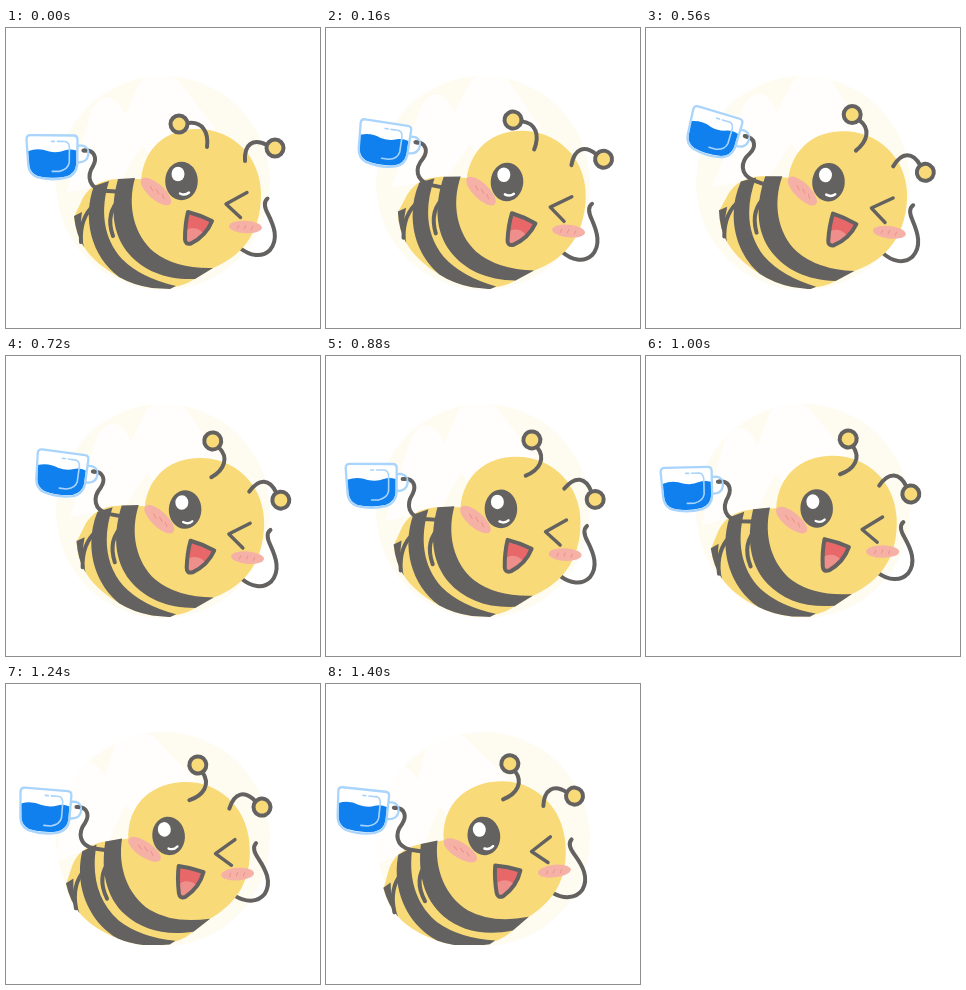
Recreate the animation shown at these times as an HTML page. Size 314 px wide and 300 px high, loop 1.44 s.

```html
<!DOCTYPE html>
<html lang="en">
<head>
<meta charset="utf-8">
<title>Waving bee</title>
<style>
  html, body { margin: 0; width: 100%; height: 100%; overflow: hidden; background: #fff; }
  svg { display: block; width: 314px; height: 300px; }
  .line { fill: none; stroke: #636260; stroke-width: 4; stroke-linecap: round; stroke-linejoin: round; }
  .dark { fill: #636260; }
  .yellow { fill: #f9da78; }
  .pink { fill: #f5b1a6; }
  .ball { fill: #f9da78; }
  .glass { fill: none; stroke: #a9d4fc; stroke-width: 2.3; stroke-linecap: round; stroke-linejoin: round; }
</style>
</head>
<body>
<svg viewBox="0 0 314 300">
  <defs>
    <clipPath id="disc"><circle cx="157" cy="155" r="107"/></clipPath>
    <clipPath id="floor"><rect width="314" height="261"/></clipPath>
    <path id="mouth" d="M182 184Q194 187 206 193Q200 208 185 215.5Q179 217 179 211Q179 196 182 184Z"/>
    <clipPath id="lips"><use href="#mouth"/></clipPath>
  </defs>

  <circle cx="157" cy="155" r="107" fill="#fefbf1"/>
  <g clip-path="url(#disc)">
    <g id="wings" fill="#fff" opacity=".75">
      <path d="M60 165L86 82Q98 60 113 76L137 116L115 152Z"/>
      <path d="M117 92L134 54Q150 38 172 52L210 102L150 135Z"/>
    </g>
  </g>

  <g clip-path="url(#floor)">
    <g id="bee">
      <path class="line" d="M234 220C244 228 256 230 264 222C273 211 268 198 262 186Q256 175 261.5 170.5"/>

      <path class="yellow" d="M136 151L112 151C95 152 82 158 75 174L68 189C70 212 82 232 113 249Q127 257 146 260Q172 262 189 251L207 240L150 150Z"/>
      <path class="yellow" d="M135 152C138 118 162 101 191 101C228 101 255 130 255 166C255 203 238 227 207 240C165 240 135 210 128 180Z"/>

      <path class="dark" d="M68 188L76 184Q73 200 78 219Q70 207 68 188Z"/>
      <path class="dark" d="M88 158L103 153C94 182 97 210 116 231Q135 250 170 258L164 261L146 260Q127 257 113 249C85 228 76 190 88 158Z"/>
      <path class="dark" d="M112 151L129 150C121 178 128 207 148 224Q170 241 207 240L189 251C160 252 138 243 123 226C106 206 104 180 112 151Z"/>
      <path class="line" d="M88 177C77 187 74 199 75 214M115 170C103 181 102 194 107 208"/>

      <g id="arm">
        <path class="line" d="M78 123C88 122 91 130 87 138C80 149 83 161 98 163L118 164"/>
        <path d="M20 112Q20 108 24 108H67Q71 108 71 112V137Q70 147 61 150Q46 154 31 150Q23 147 22 138Z" fill="#fff"/>
        <path d="M21.5 124Q32 120 42 124Q51 126 58 123Q64 121 70 123V137Q69 146 60 149Q46 152 32 149Q24 146 23 138Z" fill="#0f80ee"/>
        <path class="glass" d="M20 112Q20 108 24 108H67Q71 108 71 112V137Q70 147 61 150Q46 154 31 150Q23 147 22 138ZM71 118H76Q82 119 82 127Q81 135 71 135"/>
        <path class="glass" style="stroke-width:1.6" d="M45 114H48M51 114H59Q63 115 63 121V135Q62 142 53 144H46"/>
        <path class="line" d="M77 123H79"/>
      </g>

      <g id="left">
        <path class="line" d="M201 119C203 104 196 93 182 95"/>
        <circle class="line ball" cx="173" cy="96" r="8.5" style="fill:#f9da78"/>
      </g>
      <g id="right">
        <path class="line" d="M239 133C238 116 247 110 261 117"/>
        <circle class="line ball" cx="269" cy="120" r="8.5" style="fill:#f9da78"/>
      </g>

      <ellipse class="pink" cx="150" cy="163.5" rx="19" ry="7.8" transform="rotate(41 150 163.5)"/>
      <ellipse class="pink" cx="239.5" cy="199" rx="16.5" ry="6.3" transform="rotate(3 239.5 199)"/>
      <path d="M144 158l3 5M150 161l3 5M156 166l2 5M233 197l-2 4M240 197l-2 4M247 198l-2 4" fill="none" stroke="#f0918b" stroke-width="1"/>

      <ellipse class="dark" cx="175.5" cy="153" rx="16.3" ry="19.3"/>
      <ellipse cx="172" cy="146" rx="6.5" ry="7.3" fill="#fff"/>
      <path d="M174 165.5Q179 168 183 164.5" fill="none" stroke="#fff" stroke-width="2.4" stroke-linecap="round"/>
      <path class="line" style="stroke-width:3.4" d="M241 164.5L220 176L234.5 189.5"/>

      <g clip-path="url(#lips)">
        <rect x="175" y="180" width="35" height="40" fill="#e8686a"/>
        <ellipse cx="187" cy="209" rx="11" ry="9" fill="#ee8f8c"/>
      </g>
      <use href="#mouth" class="line"/>
    </g>
  </g>
</svg>
<script>
  const LOOP = 1440, STEP = 40;
  const times = [0, 160, 400, 720, 880, 1120, 1400];
  const sway = [0, 2.9, 4.8, 1.9, -0.3, -4.8, -9.2];
  const leftTurn = [0, 12, 30.6, 51, 60.6, 70, 70.5];
  const rightTurn = [0, 10, 23.5, 36.5, 43, 35.5, 15];

  // Smooth curve through the keyed angles
  function curve(keys, t) {
    const last = times.length - 1;
    let i = 0;
    while (i < last - 1 && t > times[i + 1]) i++;
    const slope = k => {
      const a = Math.max(k - 1, 0), b = Math.min(k + 1, last);
      return (keys[b] - keys[a]) / (times[b] - times[a]);
    };
    const h = times[i + 1] - times[i], u = (t - times[i]) / h, v = 1 - u;
    return keys[i] * (1 + 2 * u) * v * v + slope(i) * h * u * v * v
      + keys[i + 1] * u * u * (3 - 2 * u) - slope(i + 1) * h * u * u * v;
  }

  function turn(id, angle, x, y) {
    document.getElementById(id).setAttribute("transform", `rotate(${angle.toFixed(3)} ${x} ${y})`);
  }

  function draw(t) {
    const body = curve(sway, t);
    turn("bee", body, 160, 262);
    turn("wings", body, 160, 262);
    turn("arm", 7.7 - 7.5 * Math.cos(2 * Math.PI * (t + 40) / 960), 130, 170);
    turn("left", curve(leftTurn, t), 200, 119);
    turn("right", curve(rightTurn, t), 239, 133);
  }

  const start = performance.now();
  function tick() {
    const t = (performance.now() - start) % LOOP;
    draw(Math.floor(t / STEP) * STEP);
    requestAnimationFrame(tick);
  }
  tick();
</script>
</body>
</html>
```
